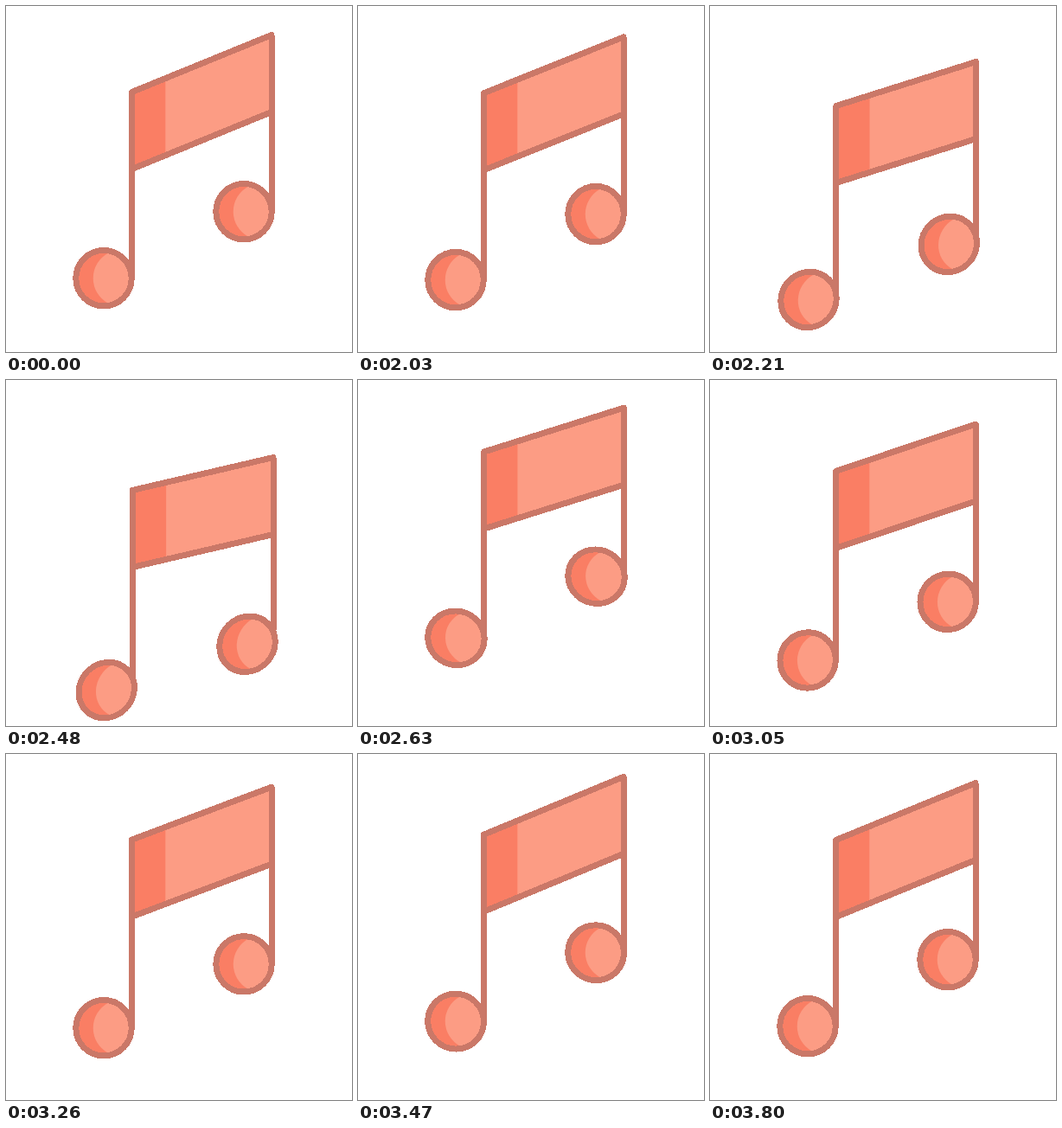
Write an HTML page that moves like this. It is 400 by 400 pixels and loops after 3830 ms.

```html
<!DOCTYPE html>
<html lang="en">
<head>
<meta charset="utf-8">
<title>Bouncing music note</title>
<style>
html, body { margin: 0; width: 100%; height: 100%; overflow: hidden; background: #fff; }
svg { display: block; width: 100vw; height: 100vh; }
.line { fill: none; stroke: #ca7868; stroke-width: 7; stroke-linejoin: round; shape-rendering: crispEdges; }
.light { fill: #fc9c84; }
.dark { fill: #fa7e64; }
</style>
</head>
<body>
<svg viewBox="0 0 400 400">
  <defs>
    <g id="head">
      <circle class="dark" r="32"/>
      <path class="light" d="M5-29A33 33 0 0 0 5 29A29.4 29.4 0 0 0 5-29Z"/>
      <circle class="line" r="32.2"/>
    </g>
  </defs>
  <path id="flag" class="light"/>
  <path id="band" class="dark"/>
  <use id="headL" href="#head"/>
  <use id="headR" href="#head"/>
  <path id="stems" class="line"/>
  <path id="edge" class="line"/>
</svg>
<script>
const LOOP = 3830, REST = 2030, STEP = 30;
const FLAG_H = 89, BAND_W = 38.8, DIP = 48;

// Turning points of the bounce; offsets in px, tilts are the extra drop of the right side
const TURNS = [
  { t: 1970, stem: 0, tilt: 0, head: 0, headTilt: 0 },
  { t: 2440, stem: 31, tilt: 29, head: DIP, headTilt: 25 },
  { t: 2720, stem: -31, tilt: 11, head: -36, headTilt: 0 },
  { t: 3110, stem: 8, tilt: 12, head: 12, headTilt: 10 },
  { t: 3400, stem: -8, tilt: -1, head: -7, headTilt: -3 },
  { t: 3650, stem: 1, tilt: 0, head: 1, headTilt: 0 },
  { t: 3800, stem: 0, tilt: 0, head: 0, headTilt: 0 }
];

const $ = id => document.getElementById(id);

function poseAt(t) {
  if (t < REST) return TURNS[0];
  const i = TURNS.findIndex(turn => turn.t > t);
  if (i < 0) return TURNS[TURNS.length - 1];
  const a = TURNS[i - 1], b = TURNS[i];
  const ease = (1 - Math.cos(Math.PI * (t - a.t) / (b.t - a.t))) / 2;
  const mix = key => a[key] + (b[key] - a[key]) * ease;
  return { stem: mix("stem"), tilt: mix("tilt"), head: mix("head"), headTilt: mix("headTilt") };
}

// Heads lean on the way down and flatten on the way up
function placeHead(id, x, y, bend) {
  const squash = Math.max(0, -bend), skew = -.045 * bend;
  $(id).setAttribute("transform",
    `matrix(${1 + .045 * squash} ${skew} ${skew} ${1 - .08 * squash} ${x} ${y})`);
}

function draw(t) {
  const { stem, tilt, head, headTilt } = poseAt(t);
  const bend = head / DIP, sway = 4.8 * bend * bend;
  const xl = 145.5 + sway * .2, xr = 307 + sway * .5;
  const yl = 99.5 + stem, yr = 33.5 + stem + tilt;
  const hl = 314.7 + head, hr = 237.7 + head + headTilt;
  const xb = xl + BAND_W, yb = yl + (yr - yl) * BAND_W / (xr - xl);
  const panel = (x, y) => `M${xl} ${yl}L${x} ${y}V${y + FLAG_H}L${xl} ${yl + FLAG_H}Z`;
  const tuck = 4 * sway;

  $("flag").setAttribute("d", panel(xr, yr));
  $("edge").setAttribute("d", panel(xr, yr));
  $("band").setAttribute("d", panel(xb, yb));
  $("stems").setAttribute("d", `M${xl} ${yl}V${hl - tuck}M${xr} ${yr}V${hr - tuck}`);
  placeHead("headL", 113 + sway * .8, hl, bend);
  placeHead("headR", 275 + sway, hr, bend);
}

const start = performance.now();
function tick() {
  const t = (performance.now() - start) % LOOP;
  draw(t < REST ? 0 : REST + Math.floor((t - REST) / STEP) * STEP);
  requestAnimationFrame(tick);
}
tick();
</script>
</body>
</html>
```
